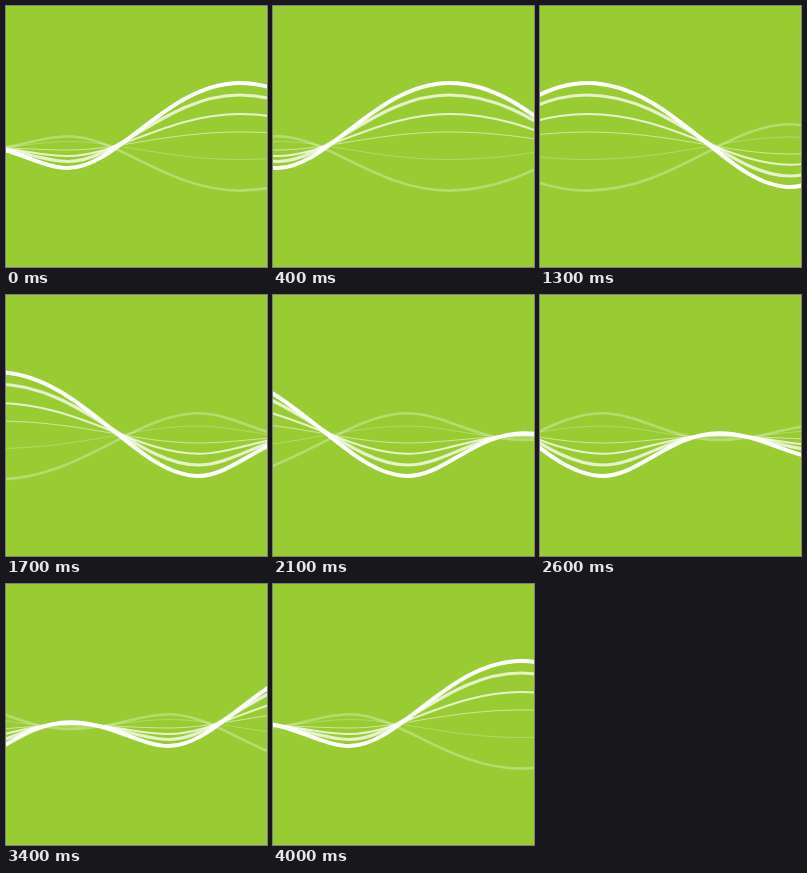
These frames come from a looping animation (261x261 px, 4100 ms). An HTML page:

```html
<!DOCTYPE html>
<html lang="en">
<head>
<meta charset="utf-8">
<title>Flowing lines</title>
<style>
  html, body { margin: 0; width: 100%; height: 100%; overflow: hidden; background: #9c3; }
  svg { display: block; width: 261px; height: 261px; overflow: hidden; }
  path { fill: none; stroke: #fff; }
</style>
</head>
<body>
<svg viewBox="0 0 261 261"><g id="wave"></g></svg>
<script>
const PERIOD = 590, LOOP = 4100, STEPS = 41;

// Turning points of one period: x, handle length as a share of the span.
const turns = [
  { x: 62, h: 0.29 },
  { x: 234, h: 0.42 },
  { x: 437, h: 0.31 },
  { x: 553, h: 0.41 }
];

// Height of each line at those turning points, back to front.
const lines = [
  { y: [130.2, 184.6, 118.3, 145], width: 2.6, alpha: 0.3 },
  { y: [135.5, 153.5, 131, 143], width: 0.8, alpha: 0.32 },
  { y: [144, 126, 148, 141.2], width: 1, alpha: 0.52 },
  { y: [150, 108, 158.7, 140], width: 2, alpha: 0.75 },
  { y: [155.5, 89, 170, 139], width: 3.2, alpha: 0.75 },
  { y: [162, 77, 181, 138.2], width: 4, alpha: 1 }
];

const wave = document.getElementById('wave');

function knot(i, ys) {
  const n = turns.length, k = (i + n) % n;
  return { x: turns[k].x + Math.floor(i / n) * PERIOD, y: ys[k], h: turns[k].h };
}

function outline(ys) {
  let a = knot(-1, ys), d = `M${a.x} ${a.y}`;
  for (let i = 0; i < 7; i++) {
    const b = knot(i, ys), w = b.x - a.x;
    d += `C${a.x + w * a.h} ${a.y} ${b.x - w * b.h} ${b.y} ${b.x} ${b.y}`;
    a = b;
  }
  return d;
}

for (const { y, width, alpha } of lines) {
  const path = document.createElementNS('http://www.w3.org/2000/svg', 'path');
  path.setAttribute('d', outline(y));
  path.setAttribute('stroke-width', width);
  path.setAttribute('stroke-opacity', alpha);
  wave.append(path);
}

wave.animate(
  [{ transform: 'translateX(0px)' }, { transform: `translateX(${-PERIOD}px)` }],
  { duration: LOOP, iterations: Infinity, easing: `steps(${STEPS}, end)` }
);
</script>
</body>
</html>
```
